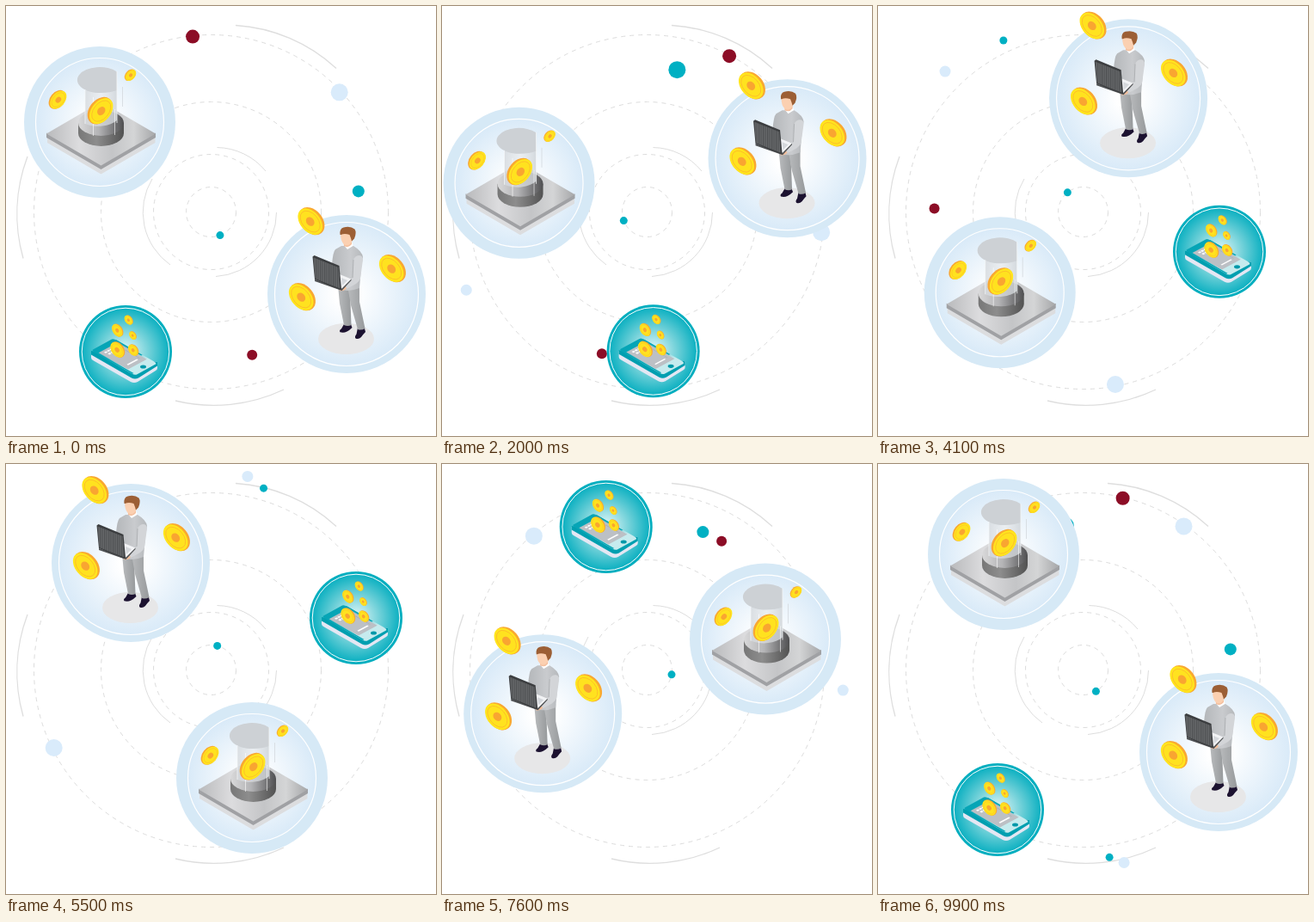
An HTML page that plays this animation: 500 by 500 pixels, repeating every 10000 ms.

```html
<!DOCTYPE html>
<html lang="en">
<head>
<meta charset="utf-8">
<title>Orbiting coins</title>
<style>
html, body { margin: 0; height: 100%; overflow: hidden; background: #fff; }
svg { display: block; width: 100%; height: 100%; }
.orbit { fill: none; stroke: #dcdcdc; stroke-dasharray: 5 5; }
.arc { fill: none; stroke: #dedede; stroke-width: 1.3; }
</style>
</head>
<body>
<svg viewBox="0 0 500 500">
<defs>
  <radialGradient id="sky"><stop offset=".15" stop-color="#fff"/><stop offset="1" stop-color="#d9eaf8"/></radialGradient>
  <radialGradient id="sea"><stop offset=".1" stop-color="#d2f1f3"/><stop offset=".55" stop-color="#6fd0d8"/><stop offset="1" stop-color="#0cb0c1"/></radialGradient>
  <linearGradient id="plate"><stop offset="0" stop-color="#b9babc"/><stop offset=".3" stop-color="#dcdcde"/><stop offset=".6" stop-color="#c4c5c7"/><stop offset=".8" stop-color="#d4d5d6"/><stop offset="1" stop-color="#a5a6a8"/></linearGradient>
  <linearGradient id="drum"><stop offset="0" stop-color="#777"/><stop offset=".4" stop-color="#8d8d8d"/><stop offset="1" stop-color="#525252"/></linearGradient>
  <linearGradient id="lid"><stop offset="0" stop-color="#d9d9da"/><stop offset=".45" stop-color="#b4b4b6"/><stop offset="1" stop-color="#4f4f51"/></linearGradient>
  <linearGradient id="glass"><stop offset="0" stop-color="#d4d8dc" stop-opacity=".8"/><stop offset=".5" stop-color="#e4e7ea" stop-opacity=".6"/><stop offset="1" stop-color="#cfd4d8" stop-opacity=".85"/></linearGradient>
  <linearGradient id="suit"><stop offset="0" stop-color="#b4b7ba"/><stop offset=".6" stop-color="#c9cbce"/><stop offset="1" stop-color="#b5b8bb"/></linearGradient>
  <linearGradient id="leg"><stop offset="0" stop-color="#b9bbbd"/><stop offset="1" stop-color="#979a9c"/></linearGradient>
  <linearGradient id="case"><stop offset=".1" stop-color="#06a5b6"/><stop offset=".8" stop-color="#c6ebee"/></linearGradient>
  <pattern id="ribs" width="2.5" height="4" patternUnits="userSpaceOnUse"><path d="M0 0h2.5v4h-2.5z" fill="#66686a"/><path d="M.6 0v4" stroke="#4c4e50"/></pattern>
  <g id="coin">
    <ellipse cx=".6" cy="-.5" rx="18" ry="12.8" transform="rotate(50)" fill="#f9a831"/>
    <g transform="translate(-.8 .6) rotate(50)">
      <ellipse rx="17.4" ry="11.6" fill="#ffe51d"/>
      <ellipse rx="14.2" ry="9.2" fill="#ffe21f" stroke="#fdb92a" stroke-width=".8"/>
      <ellipse rx="5.6" ry="4.4" fill="#f9a531"/>
    </g>
  </g>
</defs>

<g class="orbit">
  <circle cx="238.5" cy="239.5" r="206"/>
  <circle cx="238.5" cy="239.5" r="128"/>
  <circle cx="238.5" cy="239.5" r="67"/>
  <circle cx="238.5" cy="239.5" r="29"/>
</g>
<g class="arc">
  <path d="M267 22.500A190 190 0 0 1 384 72.500"/>
  <path d="M25 175A190 190 0 0 0 20 293.500"/>
  <path d="M197 459A190 190 0 0 0 323 446"/>
  <path stroke-width="1" d="M245.500 164.500A75 75 0 0 1 302 192M314.500 240A75 75 0 0 1 244 314.500M170 201A75 75 0 0 0 191 301"/>
</g>

<g id="dots"></g>

<!-- pedestal -->
<g data-path="109,135 92,169 89,214 93,262 160,360 286,365 376,329 376,191 306,115 146,105">
  <circle r="88" fill="#d6e9f6"/>
  <circle r="74.500" fill="url(#sky)" stroke="#fff" stroke-width="1.200"/>
  <g transform="translate(-109 -135)">
    <path d="M48 153l62.500 36 63-36v6l-63 36.500-62.500-36.500z" fill="#dcdddf"/>
    <path d="M47 147.500l63.500 37 63.500-37v5.500l-63.500 37-63.500-37z" fill="#a0a1a4"/>
    <path d="M47 148.500l63.500-37 63.500 37-63.500 37z" fill="url(#plate)"/>
    <path d="M84 136v12a26.500 15 0 0 0 53 0v-12z" fill="url(#drum)"/>
    <ellipse cx="110.500" cy="136" rx="26.500" ry="15" fill="url(#lid)"/>
    <path d="M92 87h37v46a26 15 0 0 1-37 4z" fill="url(#glass)"/>
    <path d="M129 76.500a26 15 0 1 0-19 24.500q11 0 19-3z" fill="#cdd1d5"/>
    <path d="M92 97v40M129 76v60" stroke="#f4f6f8" stroke-width=".8"/>
    <path d="M101.500 106v45M126.500 120v30" stroke="#fff" stroke-width=".8" stroke-opacity=".75"/>
    <path d="M135.500 94v23" stroke="#d3d9de" stroke-width=".8"/>
    <use href="#coin" transform="translate(110 121.500) scale(-.96 .98)"/>
    <use href="#coin" transform="translate(60.300 108.700) scale(-.67 .68)"/>
    <use href="#coin" transform="translate(144.700 80.300) scale(-.44 .42)"/>
  </g>
</g>

<!-- phone -->
<g data-path="139,402 190,412 258,399 357,368 412,255 407,179 308,83 179,72 68,172 139,402">
  <circle r="54" fill="#00aebf"/>
  <circle r="50.800" fill="url(#sea)" stroke="#fff"/>
  <g transform="translate(-139 -402)">
    <path d="M99 402v7q0 2 3 3.500l43 24.500q4 2 8 0l21-13q2-1 2-3v-7z" fill="#e4e7f3"/>
    <path d="M99 401v4.500l47 27q4 2 8 0l22-14v-4.500z" fill="#009fb0"/>
    <!-- the top face is a 100 by 100 square, skewed -->
    <g transform="matrix(.51 .29 .26 -.14 99 400.500)">
      <rect width="100" height="100" rx="8" fill="url(#case)"/>
      <path d="M6 3h88M6 97h60" stroke="#06a5b6" stroke-width="6"/>
      <rect x="13" y="8" width="67" height="84" fill="#bcc0c5"/>
      <path d="M20 22v50M27 25v30" stroke="#fff" stroke-width="4" stroke-dasharray="9 3"/>
      <path d="M70 25v45" stroke="#fff" stroke-width="3"/>
      <path d="M36 80h34" stroke="#a5abb1" stroke-width="2"/>
    </g>
    <ellipse cx="159.500" cy="419.500" rx="3.500" ry="2.100" fill="#0098a9"/>
    <use href="#coin" transform="translate(142.600 365) scale(.33 .35)"/>
    <use href="#coin" transform="translate(129.600 377) scale(.43 .47)"/>
    <use href="#coin" transform="translate(147.400 383) scale(.28 .31)"/>
    <use href="#coin" transform="translate(129.600 399.500) scale(.55 .58)"/>
    <use href="#coin" transform="translate(148 400) scale(.4 .42)"/>
  </g>
</g>

<!-- man with laptop -->
<g data-path="396,335 404,268 401,157 366,119 263,103 145,115 99,192 119,300 249,379 396,335">
  <circle r="92" fill="#d6e9f6"/>
  <circle r="83.500" fill="url(#sky)" stroke="#fff" stroke-width="1.200"/>
  <g transform="translate(-396 -335)">
    <ellipse cx="395.500" cy="387" rx="32.500" ry="18" fill="#e7e7e8"/>
    <path d="M393 370l8 0 1.500 4q-3 3-6 4.500-4 2-8 .8-1.500-2 1.500-4z" fill="#1c1230"/>
    <path d="M409 374l8 1 1 4q-3 3-5 6-3 3-6.500 1.500-1.500-2 1-5z" fill="#1c1230"/>
    <path d="M386 325l13 0 1.500 20 1 26q-4 2-8.500 0l-5-25z" fill="url(#leg)"/>
    <path d="M397 325l14-1 0 20 6.500 31q-4 2.500-8.500 1l-8-28z" fill="url(#leg)"/>
    <path d="M390 279l-7 4q-3 3-4 18l5 27q12 6 27 0l2-24 2-12q-1-7-11-13z" fill="url(#suit)"/>
    <path d="M392 277l5 6 6.500-4-1-4z" fill="#fff"/>
    <path d="M392 270l10 0 0 7q-4 5-9 2z" fill="#f3bf9f"/>
    <path d="M389 264q0 10 4 13 3 3 7 0 4-4 4-12z" fill="#fbd0b1"/>
    <path d="M388.500 266q-1-7 4-8.500 8-2 13 2 2.500 4-.5 11l-3 3q-1-4-2.500-7.500-6-2-10 0z" fill="#9c5f35"/>
    <path d="M404 295q2-5 7-5 4 .5 4 5l-3 22q-1 3-5 6l-11 6-2-5 9-8z" fill="#d3d5d8"/>
    <path d="M404 295l-1 21" stroke="#a7aaad" stroke-width=".8"/>
    <path d="M387 326l6-1 3 3q-3 4-8 3z" fill="#f5bf9b"/>
    <path d="M388 312l13.500 5.500-11 12-16-6z" fill="#f2f3f5"/>
    <path d="M390 316l7 3-6 6z" fill="#d5d8dc"/>
    <path d="M401.500 317.500v1.500l-11 12-31.500-11v-2l31.500 10.500z" fill="#505254"/>
    <path d="M356.500 291.500l2-1.500 29 12 2.500 27-1 1-30-12z" fill="#3c3e40"/>
    <path d="M357.500 292.500l29 11.500 2 24.500-29-11.500z" fill="url(#ribs)"/>
    <use href="#coin" x="354.500" y="250"/>
    <use href="#coin" x="449" y="305"/>
    <use href="#coin" x="344" y="338"/>
  </g>
</g>
</svg>
<script>
const STEP = 100, FRAMES = 100;
const CENTER = { x: 238.5, y: 239.5 };
const LIGHT = '#d9ebfb', RED = '#8c0d26', TEAL = '#00b0c3';

// Dots circle the center; turns holds key angles in degrees, evenly spaced in time.
const dots = [
  { fill: LIGHT, r: 10, orbit: 204, turns: [-43, 6, 72, 177, 240, 305] },
  { fill: LIGHT, r: 6.5, orbit: 229, turns: [114, 156, 220, 298, 379, 438] },
  { fill: RED, r: 8, orbit: 205, turns: [-96, -63, 16, 98, 171, 283] },
  { fill: RED, r: 6, orbit: 173, turns: [74, 107, 177, 238, 312, 400] },
  { fill: TEAL, r: 10, orbit: 169, turns: [225, 281, 370, 452, 520, 623] },
  { fill: TEAL, r: 7, orbit: 173, turns: [-8, 86, 135, 261, 298, 352] },
  { fill: TEAL, r: 4.5, orbit: 220, turns: [122, 183, 241, 299, 346, 442] },
  { fill: TEAL, r: 4.5, orbit: 29, turns: [69, 159, 226, 301, 384, 419] }
];

// Linear interpolation through evenly spaced keys, u from 0 to 1.
function at(keys, u) {
  const p = u * (keys.length - 1);
  const i = Math.min(Math.floor(p), keys.length - 2);
  return keys[i] + (keys[i + 1] - keys[i]) * (p - i);
}

function addDot({ fill, r, orbit, turns }) {
  const el = document.createElementNS('http://www.w3.org/2000/svg', 'circle');
  el.setAttribute('r', r);
  el.setAttribute('fill', fill);
  document.getElementById('dots').append(el);
  const place = u => {
    const a = at(turns, u) * Math.PI / 180;
    return [CENTER.x + orbit * Math.cos(a), CENTER.y + orbit * Math.sin(a)];
  };
  return { el, place };
}

function addScene(el) {
  const points = el.dataset.path.split(' ').map(p => p.split(',').map(Number));
  const xs = points.map(p => p[0]), ys = points.map(p => p[1]);
  return { el, place: u => [at(xs, u), at(ys, u)] };
}

const movers = [...dots.map(addDot), ...[...document.querySelectorAll('[data-path]')].map(addScene)];

function draw() {
  const frame = Math.floor(performance.now() / STEP) % FRAMES;
  for (const { el, place } of movers) {
    el.setAttribute('transform', `translate(${place(frame / (FRAMES - 1))})`);
  }
  requestAnimationFrame(draw);
}
draw();
</script>
</body>
</html>
```
